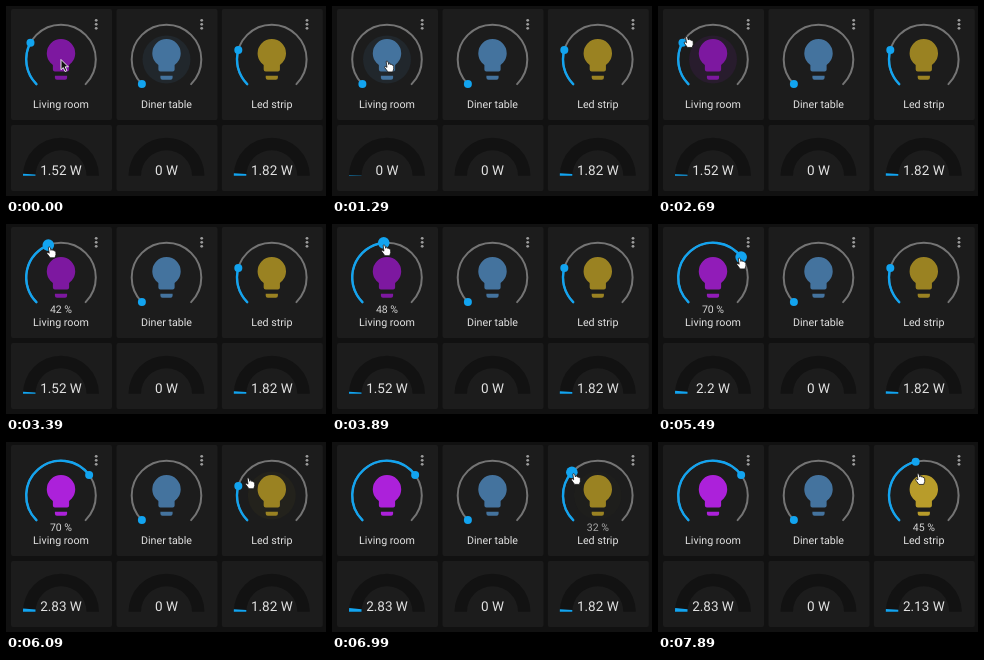
Animation, 320 px wide and 190 px high, one loop 7990 ms. Source, as an HTML page:

```html
<!DOCTYPE html>
<html lang="en">
<head>
<meta charset="utf-8">
<title>Light cards</title>
<style>
html, body { margin: 0; width: 100%; height: 100%; overflow: hidden; background: #111; }
svg { display: block; width: 320px; height: 190px; }
text { font-family: Roboto, "Noto Sans", sans-serif; text-anchor: middle; text-rendering: geometricPrecision; fill: #e1e1e1; }
.name { font-size: 10.7px; }
.percent { font-size: 10.5px; fill: #d4d4d4; }
.watts { font-size: 13.5px; }
</style>
</head>
<body>
<svg id="stage" viewBox="0 0 320 190"></svg>
<script>
const LOOP = 7990;
const BLUE = '#12a4f0';
const OFF = [68, 115, 158];
const PURPLE = { dim: [125, 24, 160], bright: [172, 33, 218] };
const GOLD = { dim: [154, 130, 34], bright: [184, 156, 42] };
const DIAL = { y: 53.5, r: 34.8 };
const GAUGE = { y: 169.7, outer: 38, inner: 25.5 };
const BULB = 'M12,2A7,7 0 0,0 5,9C5,11.38 6.19,13.47 8,14.74V17A1,1 0 0,0 9,18H15A1,1 0 0,0 16,17V14.74C17.81,13.47 19,11.38 19,9A7,7 0 0,0 12,2M9,21A1,1 0 0,0 10,22H14A1,1 0 0,0 15,21V20H9V21Z';
const HAND = 'M-.9 0Q.2-1 1 .2L1.9 3.2Q3-.1 3.6 3.1Q5 2.4 5.3 3.8Q6.8 3.1 7 5L7.1 7.8L6 11H1L-2.4 6.4Q-2.8 4.8-1.2 5.2L0 6.2Z';
const ARROW = 'M0 0V10.2L2.3 8.1L4 12L5.9 11.1L4.2 7.3H7.3Z';

// Moments of the story, in ms.
const CLICK = 290, TURN_OFF = 690, TURN_ON = 2190;
const GRAB = 2890, DIM_SENT = 4000, REGRAB = 4490, RELEASE = 5590;
const STRIP_GRAB = 6690, STRIP_RELEASE = 7590;

const stage = document.getElementById('stage');

function set(el, attrs) {
  for (const key in attrs) el.setAttribute(key, attrs[key]);
}
function add(tag, attrs) {
  const el = document.createElementNS('http://www.w3.org/2000/svg', tag);
  set(el, attrs);
  stage.append(el);
  return el;
}

// 0 before the moment, rising to 1 over the span.
const ramp = (t, at, span = 400) => Math.min(1, Math.max(0, (t - at) / span));
const between = (t, from, to, span) => ramp(t, from, span) - ramp(t, to, span);
const mix = (a, b, k) => a.map((v, i) => v + (b[i] - v) * k);
const rgb = color => `rgb(${color.map(Math.round)})`;

function polar(x, y, r, degrees) {
  const a = degrees * Math.PI / 180;
  return [x + r * Math.cos(a), y + r * Math.sin(a)];
}
function arc(x, y, r, from, to) {
  return `M${polar(x, y, r, from)}A${r} ${r} 0 ${+(to - from > 180)} 1 ${polar(x, y, r, to)}`;
}
function wedge(x, degrees) {
  const { y, outer, inner } = GAUGE, end = 180 + degrees;
  return `${arc(x, y, outer, 180, end)}L${polar(x, y, inner, end)}A${inner} ${inner} 0 0 0 ${x - inner} ${y}Z`;
}
const dialAngle = level => 135 + 2.7 * level;
const knobAt = (x, level) => polar(x, DIAL.y, DIAL.r, dialAngle(level));

function makeCard(x, name) {
  const panel = (y, height) => add('rect', { x: x - 50, y, width: 101, height, rx: 2, fill: '#1c1c1c' });
  const label = (cls, y) => add('text', { class: cls, x, y });
  const line = attrs => add('path', { fill: 'none', 'stroke-linecap': 'round', ...attrs });
  panel(3, 111);
  panel(119, 66);
  for (let i = 0; i < 3; i++) add('circle', { cx: x + 35.2, cy: 14.3 + 4 * i, r: 1.4, fill: '#9b9b9b' });
  const ripple = add('circle', { cx: x, cy: DIAL.y, r: 24 });
  line({ d: arc(x, DIAL.y, DIAL.r, 135, 405), stroke: '#747474', 'stroke-width': 2 });
  const bar = line({ stroke: BLUE, 'stroke-width': 2.4 });
  const bulb = add('path', { d: BULB, transform: `translate(${x} 53.4) scale(2.03) translate(-12 -12)` });
  const knob = add('circle', { fill: BLUE });
  const percent = label('percent', 89.3);
  label('name', 101.8).textContent = name;
  add('path', { d: wedge(x, 180), fill: '#121212' });
  const needle = add('path', { fill: BLUE });
  const watts = label('watts', 168.7);

  return t => {
    const s = { level: 0, held: false, color: OFF, ripple: 0, shown: 0, load: () => 0, ...t };
    const [cx, cy] = knobAt(x, s.level);
    set(bar, { d: s.level ? arc(x, DIAL.y, DIAL.r, 135, dialAngle(s.level)) : '' });
    set(knob, { cx, cy, r: s.held ? 5.8 : 4 });
    set(bulb, { fill: rgb(s.color) });
    set(ripple, { fill: rgb(s.color), opacity: s.ripple });
    set(percent, { opacity: s.shown });
    percent.textContent = `${Math.round(s.level)} %`;
    set(needle, { d: wedge(x, 1.95 * s.load(500)) });
    watts.textContent = `${+s.load(1).toFixed(2)} W`;
  };
}

const drawLiving = makeCard(55, 'Living room');
const drawDiner = makeCard(160.5, 'Diner table');
const drawStrip = makeCard(265.8, 'Led strip');
const hand = add('path', { d: HAND, fill: '#fff', stroke: '#111', 'stroke-width': .8, 'stroke-linejoin': 'round' });
const arrow = add('path', { d: ARROW, fill: '#111', stroke: '#fff', 'stroke-width': .9 });

function livingState(t) {
  const glow = .42 * ramp(t, DIM_SENT) + .58 * ramp(t, RELEASE);
  const lit = 1 - between(t, TURN_OFF, TURN_ON, 500);
  const off = t >= TURN_OFF && t < TURN_ON;
  return {
    level: off ? 0 : 27.3 + 20.7 * ramp(t, GRAB, 700) + 22 * ramp(t, REGRAB, 880),
    held: t >= GRAB && t < RELEASE,
    color: mix(OFF, mix(PURPLE.dim, PURPLE.bright, glow), lit),
    ripple: .12 * between(t, CLICK, GRAB, 250),
    shown: between(t, GRAB, RELEASE + 500) - .25 * between(t, DIM_SENT + 300, REGRAB + 500),
    // The meter reports a little after each change; the needle then eases over.
    load: span => 1.52 * (1 - between(t, TURN_OFF + 200, TURN_ON + 100, span))
      + .68 * ramp(t, DIM_SENT + 190, span) + .63 * ramp(t, RELEASE + 300, span)
  };
}

function stripState(t) {
  return {
    level: 22.5 + 22.5 * ramp(t, STRIP_GRAB, 700),
    held: t >= STRIP_GRAB && t < STRIP_RELEASE,
    color: mix(GOLD.dim, GOLD.bright, ramp(t, STRIP_RELEASE - 200)),
    ripple: .05 * between(t, RELEASE, STRIP_GRAB),
    shown: ramp(t, STRIP_GRAB),
    load: span => 1.82 + .31 * ramp(t, STRIP_RELEASE - 100, span * .6)
  };
}

function drawPointer(t, living, strip) {
  const grip = (x, level) => mix(knobAt(x, level), [x, DIAL.y], .07);
  const moves = [
    [CLICK, 100, [55, 55.5]],
    [TURN_ON, 500, [28.5, 31]],
    [GRAB - 200, 200, grip(55, living.level)],
    [RELEASE, 400, [242, 36.3]],
    [STRIP_GRAB - 500, 300, grip(265.8, strip.level)],
    [STRIP_RELEASE, 300, [260, 32]]
  ];
  const at = moves.reduce((p, [start, span, to]) => mix(p, to, ramp(t, start, span)), [55, 53.5]);
  const transform = `translate(${at})`;
  set(hand, { transform: `${transform} scale(.95)`, opacity: +(t >= CLICK) });
  set(arrow, { transform, opacity: +(t < CLICK) });
}

function render(now) {
  // The picture advances ten times a second.
  const t = Math.max(0, Math.floor((now % LOOP - 90) / 100) * 100 + 90);
  const living = livingState(t), strip = stripState(t);
  drawLiving(living);
  drawDiner({ ripple: .12 * (1 - ramp(t, CLICK - 100, 300)) });
  drawStrip(strip);
  drawPointer(t, living, strip);
}

let start;
function tick(now) {
  start ??= now;
  render(now - start);
  requestAnimationFrame(tick);
}
render(0);
requestAnimationFrame(tick);
</script>
</body>
</html>
```
